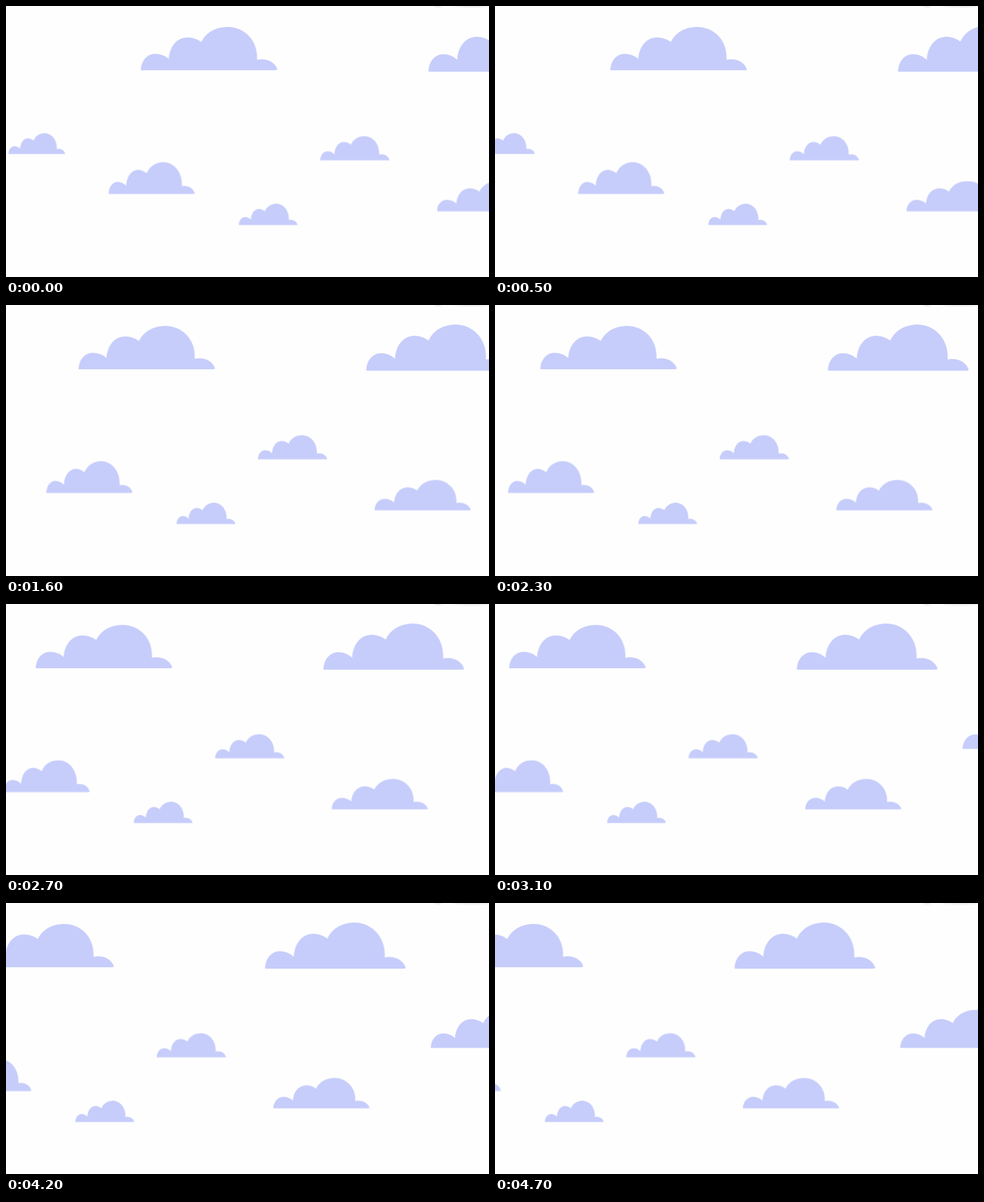
An HTML page without scripts that plays this animation: 690x388 px, repeating every 4.8 s.

```html
<!DOCTYPE html>
<html lang="en">
<head>
<meta charset="utf-8">
<title>Drifting clouds</title>
<style>
  html, body {
    margin: 0;
    width: 100%;
    height: 100%;
    overflow: hidden;
    background: #fefefe;
  }
  svg {
    display: block;
    width: 690px;
    height: 388px;
  }
  .sky {
    fill: #c6cdfb;
    animation: drift 4.8s steps(48) infinite;
  }
  /* 5.56px every 100ms */
  @keyframes drift {
    to { transform: translateX(-266.9px); }
  }
</style>
</head>
<body>
<svg viewBox="0 0 690 388">
  <defs>
    <!-- left end of the flat base sits at 0,0 -->
    <path id="cloud" d="M0 0C0 -14 9 -25 21 -25C29 -25 36 -22 41 -17
      C42 -36 53 -50 69 -50C76 -50 84 -47 89 -43
      C95 -57 110 -66 128 -66C152 -66 171 -46 171 -21L171 -16
      C185 -19 198 -12 201 -1Q200 0 198 0Z"/>
    <filter id="soft" x="-10%" y="-200%" width="120%" height="500%">
      <feGaussianBlur stdDeviation="1"/>
    </filter>
  </defs>

  <g fill="#e9e9eb" filter="url(#soft)">
    <ellipse cx="617" cy="0" rx="5" ry="2"/>
    <ellipse cx="666" cy="-1" rx="28" ry="3"/>
  </g>

  <g class="sky">
    <use href="#cloud" transform="translate(192.7 92) scale(.97 .94)"/>
    <use href="#cloud" transform="translate(603.6 94)"/>
    <use href="#cloud" transform="translate(3.6 212) scale(.403 .452)"/>
    <use href="#cloud" transform="translate(146.6 269) scale(.612 .688)"/>
    <use href="#cloud" transform="translate(332.6 313.7) scale(.418 .464)"/>
    <use href="#cloud" transform="translate(448.9 221) scale(.492 .523)"/>
    <use href="#cloud" transform="translate(615.5 294) scale(.684 .659)"/>
    <use href="#cloud" transform="translate(840.5 207.5) scale(.84 .826)"/>
  </g>
</svg>
</body>
</html>
```
